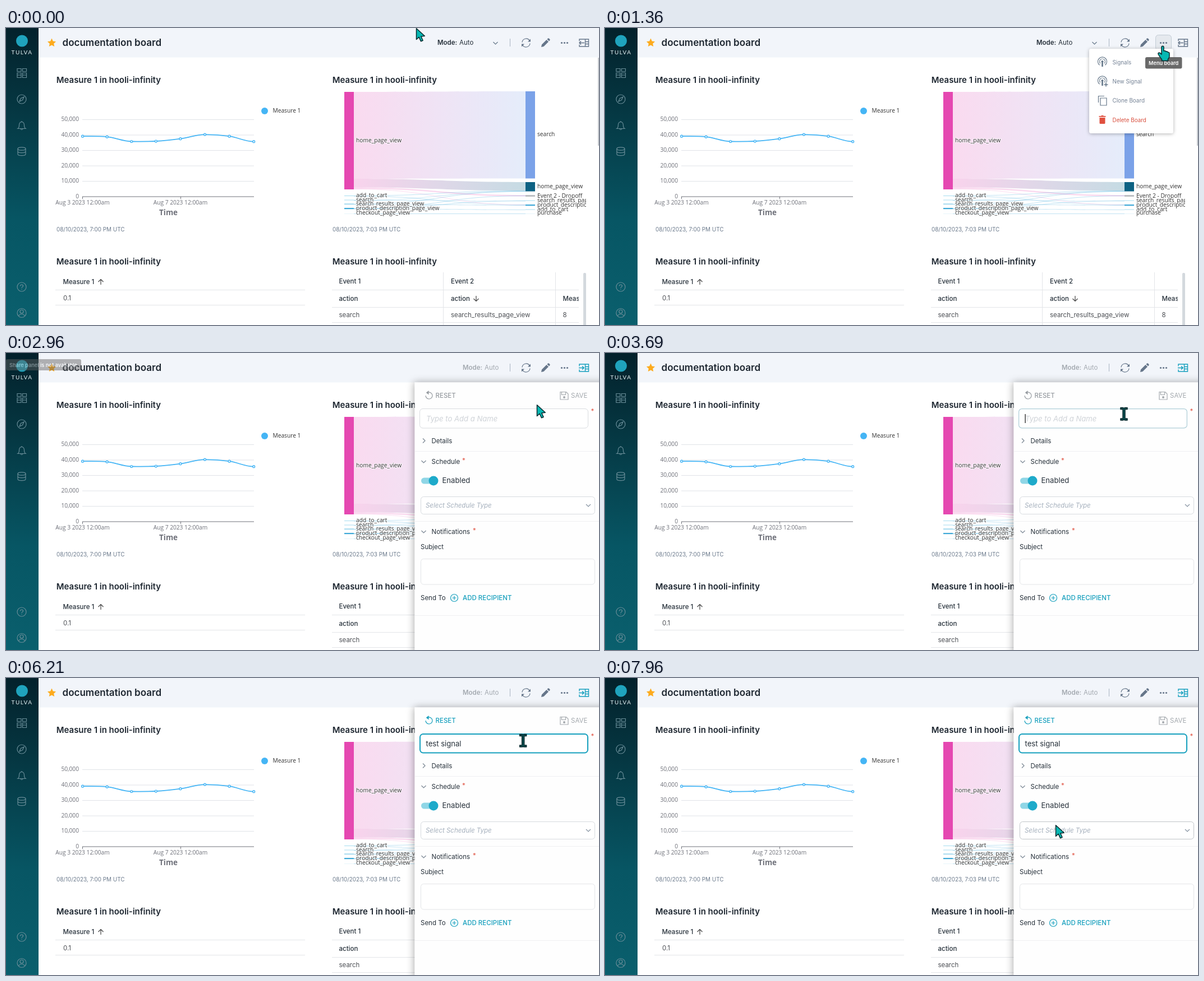
Recreate the animation shown at these times as an HTML page. Size 1057x530 px, loop 8 s.

```html
<!DOCTYPE html>
<html lang="en">
<head>
<meta charset="utf-8">
<title>Documentation board</title>
<style>
html, body { margin: 0; width: 100%; height: 100%; overflow: hidden; background: #fff; }
svg { display: block; width: 100%; height: 100%; }
text { font: 11.5px Inter, sans-serif; font-optical-sizing: none; white-space: pre; fill: #26303a; }
.title { font-size: 17.05px; font-weight: 600; fill: #1d2630; }
.heading { font-size: 14.95px; font-weight: 600; fill: #1d2630; }
.stamp { font-size: 9.9px; fill: #6b7a8c; }
.medium { font-weight: 500; }
.strong { font-weight: 600; }
.cell { fill: #4c4f54; }
.chart text { font: 10.2px "Open Sans", sans-serif; fill: #6e7079; }
.chart .label { fill: #333; stroke: #fff; stroke-opacity: .7; stroke-width: 2px; paint-order: stroke; }
.chart .axis { font-size: 13.4px; font-weight: 700; }
.menu text { font-size: 9.9px; fill: #748295; }
.tip { font-size: 9.2px; font-weight: 600; fill: #fff; }
.hint { font-style: italic; fill: #b3b9c1; }
.field { font-size: 13.1px; }
.red { fill: #e0503f; }
.line { fill: none; stroke-width: 1.2; }
</style>
</head>
<body>
<svg viewBox="0 0 1057 530" preserveAspectRatio="none">
<defs>
  <linearGradient id="side" x2="0" y2="1">
    <stop stop-color="#03212b"/><stop offset=".25" stop-color="#053540"/>
    <stop offset=".65" stop-color="#075664"/><stop offset="1" stop-color="#0a5f6d"/>
  </linearGradient>
  <linearGradient id="toSearch"><stop stop-color="#e548b1"/><stop offset="1" stop-color="#7ba2e8"/></linearGradient>
  <linearGradient id="toHome"><stop stop-color="#e548b1"/><stop offset="1" stop-color="#0e6a8c"/></linearGradient>
  <filter id="shadow" x="-20%" y="-20%" width="140%" height="140%">
    <feDropShadow dx="0" dy="1" stdDeviation="3" flood-opacity=".3"/>
  </filter>
  <filter id="panelShadow" x="-10%" y="-10%" width="120%" height="120%">
    <feDropShadow dx="-1" dy="0" stdDeviation="7" flood-opacity=".34"/>
  </filter>
  <clipPath id="flowClip"><rect x="581" y="105" width="453" height="240"/></clipPath>
  <clipPath id="tableClip"><rect x="581" y="430" width="440" height="100"/></clipPath>
  <g id="signal" class="line" stroke="#66788a" stroke-width="1.4">
    <path d="M-5 6.2A8 8 0 1 1 5 6.2M-3.6 3.2A4.9 4.9 0 1 1 3.6 3.2"/>
    <circle r="1.5" fill="#66788a"/><path d="M0 2V9" stroke-width="2.6"/>
  </g>
</defs>

<!-- header -->
<rect x="58" width="999" height="52.5" fill="#f2f5fa"/>
<path id="star" fill="#fdab1d"/>
<text class="title" x="100.5" y="32">documentation board</text>
<g id="mode"><text class="strong" x="769" y="30">Mode:</text><text x="808" y="30">Auto</text></g>
<path id="modeChevron" class="line" d="M868.5 25l4 4 4-4" stroke="#66788a"/>
<path d="M898.5 19v14" stroke="#a9b5c2"/>
<rect id="dotsHover" x="981.5" y="12.5" width="28" height="27" rx="5" fill="#e5e9ee" stroke="#c3ccd5"/>
<g fill="#66768a">
  <path class="line" d="M920 25.5a7.2 7.2 0 0 1 13-3.500M934 27.500a7.200 7.200 0 0 1-13 3.500" stroke="#66768a"/>
  <path d="M935 19.500v5h-5zM919 33.500v-5h5z"/>
  <path d="M954 34l1-4.500 8.500-8.500 3.500 3.500-8.500 8.500zM964.500 20l1.600-1.500q.9-.7 1.700 0l1.600 1.700q.7.9 0 1.700l-1.400 1.500z"/>
  <circle cx="990.500" cy="26.500" r="1.600"/><circle cx="995.500" cy="26.500" r="1.600"/><circle cx="1000.500" cy="26.500" r="1.600"/>
</g>
<g id="panelIcon" class="line">
  <path d="M1022 23.500v-3.500h16.500v13h-16.500v-3.500M1032.500 20v13M1032.500 24.500h6M1032.500 28.500h6" stroke-width="1.400"/>
  <path id="panelArrow" stroke-width="1.600"/>
</g>

<!-- line chart -->
<text class="heading" x="89.800" y="97.700">Measure 1 in hooli-infinity</text>
<g class="chart">
  <g id="grid"></g>
  <path d="M136 301H442M136.500 301v4M311.500 301v4" stroke="#6e7079" fill="none"/>
  <g id="series" fill="#fff" stroke="#45b5f5" stroke-width="1.800"></g>
  <circle cx="461" cy="148" r="6" fill="#45b5f5"/>
  <text x="475.500" y="151" style="fill:#333">Measure 1</text>
  <text x="136.500" y="315" text-anchor="middle">Aug 3 2023 12:00am</text>
  <text x="311" y="315" text-anchor="middle">Aug 7 2023 12:00am</text>
  <text class="axis" x="289.500" y="334" text-anchor="middle">Time</text>
</g>
<text class="stamp" x="90" y="362.500">08/10/2023, 7:00 PM UTC</text>

<!-- flow chart -->
<text class="heading" x="581.800" y="97.700">Measure 1 in hooli-infinity</text>
<g class="chart" id="flow" clip-path="url(#flowClip)"></g>
<text class="stamp" x="582" y="362.500">08/10/2023, 7:03 PM UTC</text>

<!-- tables -->
<text class="heading" x="89.800" y="421.500">Measure 1 in hooli-infinity</text>
<text class="medium" x="101.500" y="456.500">Measure 1</text>
<path class="line" d="M169 458v-9.500M164.500 453l4.500-4.500 4.500 4.500" stroke="#444"/>
<text class="cell" x="102" y="485.500">0.1</text>
<path d="M88 467.500H533M88 494.500H533" stroke="#e3e5e8"/>
<text class="heading" x="581.800" y="421.500">Measure 1 in hooli-infinity</text>
<g clip-path="url(#tableClip)">
  <path d="M581 467.500h440M581 498.500h440M581 525.500h440M779.500 436v94M979.500 436v94" stroke="#e3e5e8"/>
  <text class="medium" x="593.500" y="456">Event 1</text><text class="medium" x="793" y="456">Event 2</text>
  <text class="medium" x="593.500" y="487">action</text><text class="medium" x="793" y="487">action</text>
  <text class="medium" x="992.500" y="487">Measure 1</text>
  <path class="line" d="M838 478v9.500M833.500 483l4.500 4.500 4.500-4.500" stroke="#444"/>
  <text class="cell" x="593.500" y="515.500">search</text>
  <text class="cell" x="793" y="515.500">search_results_page_view</text>
  <text class="cell" x="992.500" y="515.500">8</text>
</g>
<rect x="1029" y="437" width="5" height="100" rx="2" fill="#d4d9de"/>
<rect x="1055" y="53" width="2" height="157" fill="#c6cacf"/>

<!-- sidebar -->
<rect width="58" height="530" fill="url(#side)"/>
<circle cx="28.500" cy="23" r="10.500" fill="#1fa3bd"/>
<text x="28.500" y="46.500" text-anchor="middle" style="font:10px Lato,sans-serif;letter-spacing:1.5px;fill:#e8f1f3">TULVA</text>
<g class="line" stroke="#688c97">
  <path d="M20 72.500h7v5h-7zM29.500 72.500h7v5h-7zM20 80h7v8.500h-7zM29.500 80h7v8.500h-7zM20 84h7M29.500 84h7"/>
  <circle cx="28" cy="127" r="8"/><path d="M32 123l-2.500 5.500-5.500 2.500 2.500-5.500z"/>
  <path d="M21 179.500q2.500-1.500 2.500-6 0-5.500 4.500-6 4.500.5 4.500 6 0 4.500 2.500 6zM26 180q2 3 4 0M28 166v1.500"/>
  <ellipse cx="28" cy="215.500" rx="7" ry="2.700"/>
  <path d="M21 215.500v9.500c0 3.600 14 3.600 14 0v-9.500M21 220c0 3.600 14 3.600 14 0"/>
  <circle cx="28" cy="462" r="8"/>
  <path d="M25.500 460.500q0-2.500 2.500-2.500t2.500 2.200q0 1.300-1.500 2-1 .5-1 1.800M28 465.500v1.300"/>
  <circle cx="28" cy="508.500" r="8"/><circle cx="28" cy="506" r="3"/><path d="M22.500 514q1.500-3.500 5.500-3.500t5.500 3.500"/>
</g>

<!-- board menu -->
<g id="menu" class="menu">
  <rect x="863" y="37" width="150" height="151" rx="4" fill="#fff" filter="url(#shadow)"/>
  <rect id="itemHover" x="869.500" width="136" height="34" rx="6" fill="#f5f7f9" stroke="#b9c4ce"/>
  <use href="#signal" x="886.500" y="60"/>
  <use href="#signal" x="886.500" y="94"/>
  <path d="M889 101h8M893 97v8" stroke="#fff" stroke-width="4"/>
  <path d="M889.500 101h7M893 97.500v7" stroke="#66788a" stroke-width="1.600"/>
  <path class="line" d="M879.500 133v-11.500h10.500M883 125h11v13h-11z" stroke="#66788a" stroke-width="1.500"/>
  <path class="red" d="M880.500 157h3.500l1-1h3l1 1h3.500v1.800h-12zM881.500 160h10v9.500q0 1.500-1.500 1.500h-7q-1.500 0-1.500-1.500z"/>
  <text x="904.500" y="64.800">Signals</text><text x="904.500" y="99">New Signal</text>
  <text x="904.500" y="133.300">Clone Board</text><text x="904.500" y="167.600" style="fill:#d9503f">Delete Board</text>
</g>
<g id="tooltip">
  <rect x="963" y="52" width="65.500" height="20.500" rx="3" fill="#616161" opacity=".95"/>
  <text class="tip" x="995.700" y="65.500" text-anchor="middle">Menu board</text>
</g>

<!-- signal panel -->
<g id="panel">
  <rect x="728.500" y="52.500" width="345" height="500" fill="#fefefe" filter="url(#panelShadow)"/>
  <g id="reset">
    <path class="line" d="M750 71.500a6 6 0 1 1-2 4.500" stroke-width="1.600"/>
    <path d="M753.500 67v7.500l-4.700-3.700z" stroke="none"/>
    <text class="medium" x="765.500" y="80" style="fill:inherit">RESET</text>
  </g>
  <path class="line" d="M988 69.500h10.500l3.500 3.500v10h-14zM990.500 70v4.500h7v-4.500" stroke="#a3a8ad" stroke-width="1.400"/>
  <circle cx="995" cy="79" r="2" fill="#a3a8ad"/>
  <text x="1007" y="80" style="fill:#a3a8ad">SAVE</text>
  <rect id="nameBox" rx="5.500" fill="#fff"/>
  <text id="nameHint" class="field hint" x="749" y="121.700" style="fill:#cfd3d8">Type to Add a Name</text>
  <text id="name" class="field" x="748.500" y="121.700"></text>
  <rect id="caret" y="109" width="1.200" height="16" fill="#111"/>
  <path class="line" d="M743 152.500l4 4-4 4M740.500 192l4 4 4-4M740.500 317l4 4 4-4" stroke="#7b8794"/>
  <text x="758.500" y="161">Details</text>
  <text x="758.500" y="198">Schedule</text>
  <text x="758.500" y="323">Notifications</text>
  <text class="red" x="1042.500" y="108">*</text><text class="red" x="813" y="196">*</text><text class="red" x="832" y="321">*</text>
  <path d="M729 175.500h328M729 300.500h328M729 468.500h328" stroke="#f0f0f2"/>
  <rect x="740" y="222.500" width="29" height="11" rx="5.500" fill="#8fd6e6"/>
  <circle cx="762" cy="228" r="8.500" fill="#1eaaca"/>
  <text x="777.500" y="232.300" class="field">Enabled</text>
  <rect id="typeBox" x="739.500" y="256.500" width="310" height="31" rx="5" fill="#fff"/>
  <text class="hint" x="748" y="276" style="fill:#a4afbc">Select Schedule Type</text>
  <path class="line" d="M1034 270l4 4 4-4" stroke="#8592a0"/>
  <text x="739" y="349.500">Subject</text>
  <rect x="739.500" y="367.500" width="310" height="45.500" rx="5" fill="#fff" stroke="#e3e5e8"/>
  <text x="739" y="440.800">Send To</text>
  <g class="line" stroke="#159fbd"><circle cx="799" cy="437" r="6.500"/><path d="M795.500 437h7M799 433.500v7"/></g>
  <text class="medium" x="814" y="440.800" style="fill:#159fbd">ADD RECIPIENT</text>
</g>
<g id="toast">
  <rect y="11" width="134" height="20" rx="3" fill="#616161"/>
  <text class="tip" x="6" y="24.500">Share panel is not available</text>
</g>

<!-- pointers, each with its hot spot at 0,0 -->
<g id="pointer" fill="#06b8b3" stroke="#082a2e" stroke-width="1.500" stroke-linejoin="round">
  <path id="arrow" d="M.5.8V20.500l4.600-4.200 3.400 7.500 3.600-1.600-3.300-7.200 6.500-.7z"/>
  <path id="hand" d="M-2 2.500q0-2.200 2-2.200t2 2.200v6.500q3.200-1 3.700 1 3-.6 3.400 1.300 2.900-.3 2.900 2.200v5q0 3-2.500 5v3h-11v-2.500q-3.500-4-6-8.500-1.300-2.500.5-3.300 2-.6 5 2.800z"/>
  <path id="beam" d="M-6-11.500h4.500l1.500 1 1.500-1h4.500v3h-4v16.500h4v3h-4.500l-1.500-1-1.500 1h-4.500v-3h4v-16.500h-4z" fill="#0a4f50"/>
  <g id="denied" fill="none">
    <path d="M-5.300-5.300l10.600 10.600M-7.500 0a7.500 7.500 0 1 1 15 0a7.500 7.500 0 1 1-15 0" stroke-width="5.500"/>
    <path d="M-5.300-5.300l10.600 10.600M-7.500 0a7.500 7.500 0 1 1 15 0a7.500 7.500 0 1 1-15 0" stroke="#0fa9a0" stroke-width="2.300"/>
  </g>
</g>
</svg>
<script>
const el = id => document.getElementById(id);
const show = (id, opacity) => el(id).setAttribute("opacity", +opacity);
const set = (id, attrs) => { for (const k in attrs) el(id).setAttribute(k, attrs[k]); };
const ramp = (t, from, to) => Math.min(1, Math.max(0, (t - from) / (to - from)));
const mix = (a, b, k) => a.map((v, i) => v + (b[i] - v) * k);
const teal = [21, 159, 189];

function drawStar() {
  const corners = Array.from({ length: 10 }, (_, i) => {
    const r = i % 2 ? 3.9 : 8, a = i * Math.PI / 5;
    return `${81.5 + r * Math.sin(a)} ${26.6 - r * Math.cos(a)}`;
  });
  el("star").setAttribute("d", `M${corners.join("L")}Z`);
}

function drawLineChart() {
  let grid = "";
  for (let i = 0; i <= 5; i++) {
    const y = 301 - i * 27.5;
    if (i) grid += `<path d="M136 ${y}H442" stroke="#e0e3e8"/>`;
    grid += `<text x="130" y="${y + 2.8}" text-anchor="end">${i ? i * 10 + ",000" : 0}</text>`;
  }
  el("grid").innerHTML = grid;
  const pts = [193.2, 194.2, 202.5, 202, 197.7, 190.1, 193.2, 202.7].map((y, i) => [136.5 + i * 43.6, y]);
  const slope = i => {
    const before = pts[i][1] - (pts[i - 1] || pts[i])[1], after = (pts[i + 1] || pts[i])[1] - pts[i][1];
    return before * after > 0 ? (before + after) / 6 : 0;
  };
  let d = `M${pts[0]}`;
  for (let i = 1; i < pts.length; i++) {
    const [x0, y0] = pts[i - 1], [x1, y1] = pts[i];
    d += `C${x0 + 15} ${y0 + slope(i - 1)} ${x1 - 15} ${y1 - slope(i)} ${x1} ${y1}`;
  }
  el("series").innerHTML = `<path d="${d}" fill="none"/>` +
    pts.map(([x, y]) => `<circle cx="${x}" cy="${y}" r="1.9" stroke-width="1.4"/>`).join("");
}

function drawFlow() {
  const band = (y0, h0, y1, h1, fill, opacity) =>
    `<path d="M620 ${y0}C773 ${y0} 773 ${y1} 926 ${y1}V${y1 + h1}C773 ${y1 + h1} 773 ${y0 + h0} 620 ${y0 + h0}Z" fill="${fill}" opacity="${opacity}"/>`;
  const node = (x, [name, y, h, fill, labelY = y + h / 2]) =>
    [`<rect x="${x}" y="${y}" width="17" height="${h}" fill="${fill}"/>`,
     `<text class="label" x="${x + 21}" y="${labelY + 3}">${name}</text>`];
  const sky = "#3fa9d8", pale = "#a5dcf0";
  const left = [
    ["home_page_view", 114, 174, "#e548b1", 200.5], ["add_to_cart", 299, 1, pale, 299],
    ["search", 306.5, 1, pale, 306.7], ["search_results_page_view", 313.5, 1.3, "#7cc9e8"],
    ["product_description_page_view", 321, 2.2, sky, 321.5], ["checkout_page_view", 331, .6, "#d5eef7", 330]
  ];
  const right = [
    ["search", 113, 155.5, "#7ba2e8", 190.3], ["home_page_view", 275, 16.5, "#0e6283", 282.8],
    ["Event 2 - Dropoff", 298, 3, "#bcbfc3"], ["search_results_page_view", 307.5, 1, pale],
    ["product_description_page_view", 315, 2.2, sky, 315.5], ["add_to_cart", 323.5, 1, pale], ["purchase", 331, .6, "#d5eef7", 330.3]
  ];
  const links = [[299, 290], [299.5, 315], [307, 291], [307, 308], [314, 291], [314, 316], [322, 299], [322, 308], [322, 324], [331, 331]];
  const nodes = [...left.map(n => node(603, n)), ...right.map(n => node(926, n))];
  el("flow").innerHTML =
    band(114, 155, 113, 155.5, "url(#toSearch)", .2) + band(269, 15.5, 275, 15.5, "url(#toHome)", .24) +
    band(284.5, 2.5, 298, 2.5, "#e548b1", .2) + band(287, 1, 315, 1, "#e548b1", .18) +
    links.map(([a, b]) => band(a, .9, b, .9, sky, .32)).join("") +
    nodes.map(n => n[0]).join("") + nodes.map(n => n[1]).join("");
}

// start, end, destination
const moves = [
  [20, 820, 1001, 53], [850, 1010, 994, 32], [1590, 2390, 946, 92], [2970, 3500, 925, 109],
  [6130, 6920, 812, 212], [6940, 7320, 785, 223], [7400, 7730, 790, 222], [7750, 7950, 803, 262]
];
function pointerAt(t) {
  let at = [731, 0];
  for (const [start, end, x, y] of moves) {
    const k = ramp(t, start, end);
    at = mix(at, [x, y], k * k * (3 - 2 * k));
  }
  return at;
}
function pointerKind(t, y) {
  if (t < 860) return "arrow";
  if (t < 2690) return "hand";
  if (t < 2930) return "denied";
  if (y < 99 || y > 239) return "arrow";
  return y < 135 ? "beam" : "hand";
}

const phrase = "test signal";
const keyTimes = [4430, 4520, 4610, 4720, 4800, 4950, 5030, 5110, 5200, 5380, 5430];
const caretOn = t => t >= 3670 && t < 4170 || t >= 4430 && t < 5960 || t >= 6460 && t < 7000;

function render(t) {
  const [x, y] = pointerAt(t), kind = pointerKind(t, y);
  set("pointer", { transform: `translate(${x} ${y})` });
  for (const id of ["arrow", "hand", "beam", "denied"]) el(id).style.display = id === kind ? "" : "none";

  const open = t >= 2760;
  show("dotsHover", t >= 870 && t < 2690 && y < 40);
  show("tooltip", ramp(t, 980, 1100) * (1 - ramp(t, 1800, 1950)));
  show("menu", open ? 0 : ramp(t, 1230, 1330));
  show("itemHover", t > 1590 && y > 44);
  set("itemHover", { y: y < 78 ? 44.5 : 78.5 });

  show("panel", open);
  show("toast", open ? .9 * (1 - ramp(t, 2860, 3070)) : 0);
  show("mode", open ? .38 : 1);
  set("mode", { transform: open ? "translate(45 0)" : "" });
  show("modeChevron", !open);
  set("panelIcon", { stroke: open ? "#159fbd" : "#66768a" });
  set("panelArrow", { d: open ? "M1021 26.5h9M1027 23.5l3 3-3 3" : "M1031 26.5h-9M1025 23.5l-3 3 3 3" });

  const focus = ramp(t, 3660, 3800), edge = 1 + focus;
  set("nameBox", {
    x: 737 + edge / 2, y: 99 + edge / 2, width: 301 - edge, height: 35.5 - edge,
    stroke: `rgb(${mix([217, 220, 224], teal, focus)})`, "stroke-width": edge
  });
  const typed = phrase.slice(0, keyTimes.filter(k => t >= k).length);
  if (el("name").textContent !== typed) el("name").textContent = typed;
  show("nameHint", !typed);
  const resetColor = `rgb(${mix([150, 155, 160], teal, ramp(t, 4430, 4600))})`;
  set("reset", { fill: resetColor });
  el("reset").firstElementChild.setAttribute("stroke", resetColor);
  show("caret", caretOn(t));
  set("caret", { x: 748.5 + (typed ? el("name").getComputedTextLength() : 0) });
  set("typeBox", { stroke: y > 256 ? "#c0c4c8" : "#d7dbdf" });
}

drawStar();
drawLineChart();
drawFlow();
const startTime = performance.now();
(function tick() {
  render((performance.now() - startTime) % 8000);
  requestAnimationFrame(tick);
})();
</script>
</body>
</html>
```
